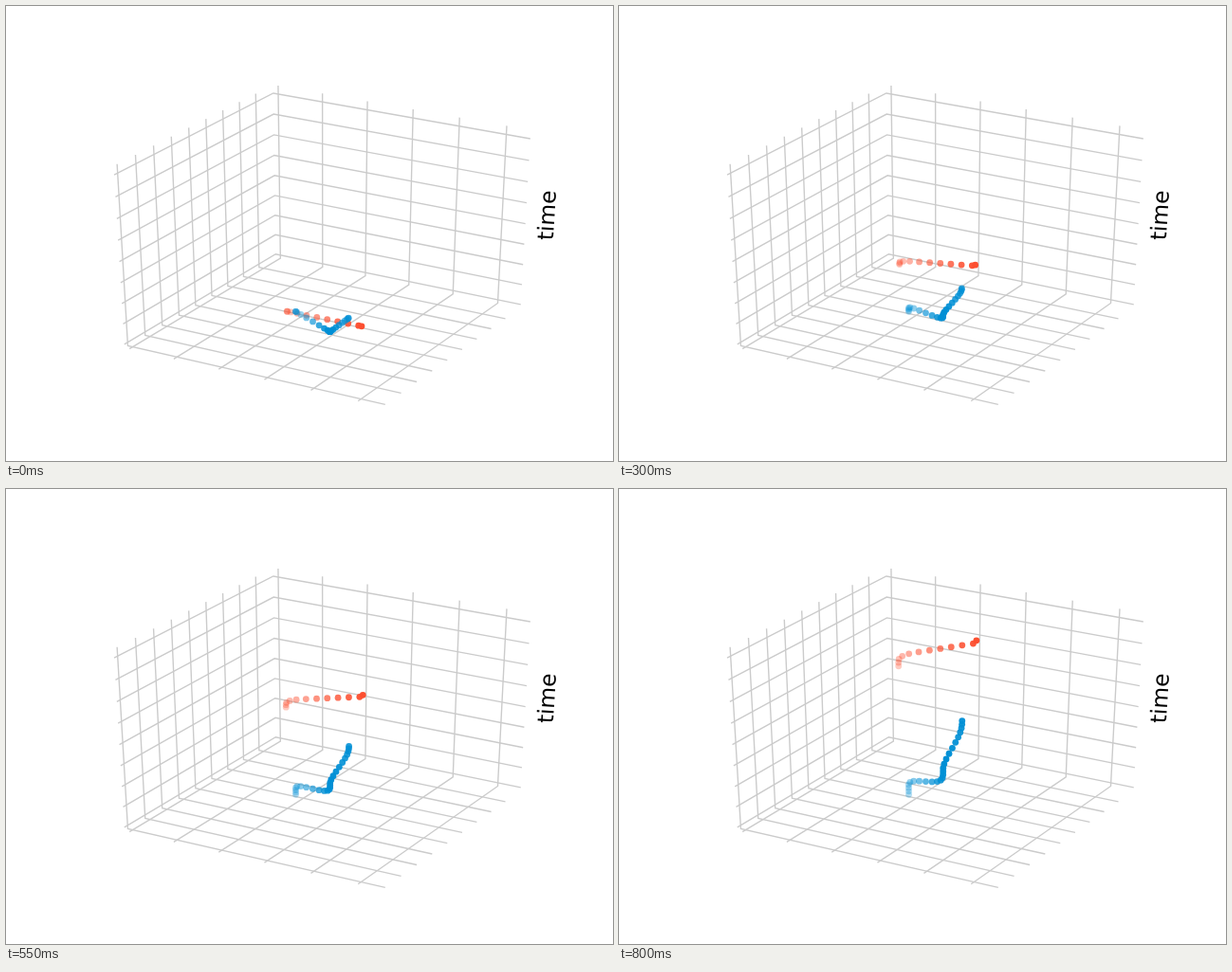
An HTML page with a canvas that plays this animation: 640x480 px, repeating every 1.85 s.

```html
<!DOCTYPE html>
<html>
<head>
<meta charset="utf-8">
<style>
html, body { margin: 0; width: 100%; height: 100%; overflow: hidden; background: #fff; }
canvas { display: block; }
</style>
</head>
<body>
<canvas id="stage" width="640" height="480"></canvas>
<script>
const ctx = document.getElementById('stage').getContext('2d');
const STEP = 50, LAST = 16, LOOP = 1850;
const SIN = Math.sin(Math.PI / 6), COS = Math.cos(Math.PI / 6);
const WALL = 0.5 + 1 / 48, DISTANCE = 10, RISE = 0.01995;

const clamp = v => Math.max(0, Math.min(1, v));
const mix = (a, b, t) => a.map((v, i) => v + (b[i] - v) * t);

// Perspective camera at 30 degrees elevation and -60 degrees azimuth.
function project([x, y, z]) {
  const right = COS * x + SIN * y;
  const back = COS * y - SIN * x;
  const depth = DISTANCE + COS * back - SIN * z;
  return {
    x: 337.13 + 3009.7 * right / depth,
    y: 246.75 - 2101.6 * (SIN * back + COS * z) / depth,
    depth
  };
}

// Grid lines start at the lower limit and bend where two planes meet.
const grids = [
  { count: 6, gap: 0.1855, bend: v => [[v, WALL, WALL], [v, WALL, -WALL], [v, -WALL, -WALL]] },
  { count: 9, gap: 0.1123, bend: v => [[-WALL, v, WALL], [-WALL, v, -WALL], [WALL, v, -WALL]] },
  { count: 9, gap: 0.1215, bend: v => [[-WALL, -WALL, v], [-WALL, WALL, v], [WALL, WALL, v]] }
];

function drawGrid({ count, gap, bend }) {
  for (let i = 0; i < count; i++) {
    ctx.beginPath();
    for (const corner of bend(-0.5 + i * gap)) {
      const p = project(corner);
      ctx.lineTo(p.x, p.y);
    }
    ctx.stroke();
  }
}

// Speeds up quickly and settles slowly.
const settle = t => 1 - (1 - clamp(t) ** 2) ** 4;

// Accelerates for a while, then keeps its speed until it stops.
function launch(t) {
  const ramp = 3.3, s = Math.max(0, t);
  return clamp(0.139 * (s < ramp ? s * s / (2 * ramp) : s - ramp / 2));
}

// Floor position by sample index.
const redPath = j => mix([-0.183, 0.036], [0.122, 0.046], launch(j - 39.45));
function bluePath(j) {
  const corner = mix([-0.155, 0.051], [0.05, -0.056], settle((j - 3) / 10));
  return mix(corner, [0.0426, 0.091], settle((j - 13.7) / 11));
}

const trails = [
  { color: '#fc4f30', first: 38, last: 49, path: redPath },
  { color: '#008fd5', first: 0, last: 24, path: bluePath }
];

function drawTrail({ color, first, last, path }, rise) {
  const dots = [];
  for (let j = first; j <= last; j++) dots.push(project([...path(j), -0.5 + j * RISE * rise]));
  dots.sort((a, b) => b.depth - a.depth);
  const far = dots[0].depth, near = dots[dots.length - 1].depth;
  ctx.fillStyle = color;
  for (const { x, y, depth } of dots) {
    ctx.globalAlpha = 1 - 0.7 * (depth - near) / (far - near);
    ctx.beginPath();
    ctx.arc(x, y, 3.4, 0, 2 * Math.PI);
    ctx.fill();
  }
  ctx.globalAlpha = 1;
}

function drawLabel() {
  ctx.save();
  ctx.translate(576.7, 247.6);
  ctx.rotate(-86.5 * Math.PI / 180);
  ctx.font = '23.33px "DejaVu Sans", sans-serif';
  ctx.fillStyle = '#000';
  ctx.fillText('time', 0, 0);
  ctx.restore();
}

function draw() {
  const step = Math.min(LAST, Math.floor(performance.now() % LOOP / STEP));
  ctx.fillStyle = '#fff';
  ctx.fillRect(0, 0, 640, 480);
  ctx.strokeStyle = '#cbcbcb';
  ctx.lineWidth = 1.39;
  grids.forEach(drawGrid);
  trails.forEach(trail => drawTrail(trail, step / LAST));
  drawLabel();
  requestAnimationFrame(draw);
}
draw();
</script>
</body>
</html>
```
